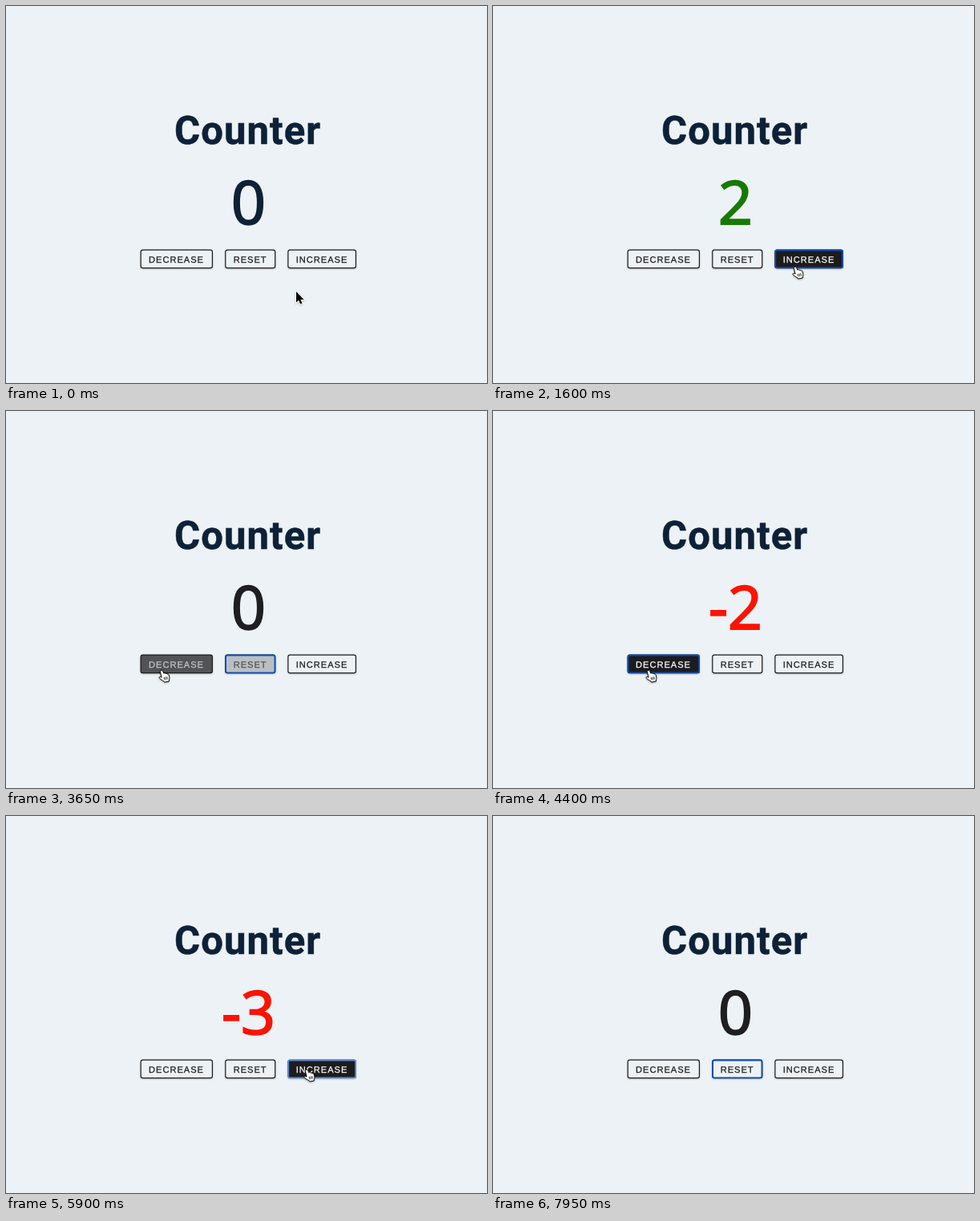
Animation, 600 px wide and 470 px high, one loop 8 s. Source, as an HTML page:

```html
<!DOCTYPE html>
<html lang="en">
<head>
<meta charset="utf-8">
<title>Counter</title>
<style>
  html, body { margin: 0; width: 100%; height: 100%; overflow: hidden; background: #ecf2f5; }
  svg { display: block; width: 600px; height: 470px; }
  text { text-rendering: geometricPrecision; }
  .title { font: 700 49px Roboto, sans-serif; letter-spacing: 1.1px; fill: #0d2138; stroke: #0d2138; stroke-width: 0.5px; }
  .value { font: 400 75px "Open Sans", sans-serif; text-anchor: middle; stroke-width: 2px; }
  .label { font: 400 11.1px "Liberation Sans", Arial, sans-serif; letter-spacing: 0.97px; stroke-width: 0.25px; }
</style>
</head>
<body>
<svg id="stage" viewBox="0 0 600 470">
  <defs>
    <filter id="soft" x="-20%" y="-40%" width="140%" height="180%"><feGaussianBlur stdDeviation="1.2"/></filter>
    <filter id="drop" x="-50%" y="-50%" width="200%" height="200%">
      <feDropShadow dx="0" dy="1" stdDeviation="0.8" flood-color="#000" flood-opacity="0.3"/>
    </filter>
  </defs>
  <text class="title" x="210" y="171.5">Counter</text>
  <text class="value" id="value" x="302.5" y="272">0</text>
  <g id="buttons"></g>
  <g id="cursor" filter="url(#drop)">
    <path id="arrow" d="M0 0v13.6l3.1-2.9 2 4.8 2.3-1-2-4.6h4.2z" fill="#000" stroke="#fff" stroke-width="1.4" paint-order="stroke"/>
    <g id="hand" transform="translate(-5 -0.5)" stroke="#000" stroke-width="1" stroke-linejoin="round" stroke-linecap="round">
      <path fill="#fff" d="M3.6.6c.9-.3 1.7.2 2 1l1.2 3c.6-.7 1.9-.5 2.2.3.7-.5 1.8-.3 2 .6.9-.4 1.9.1 2.1 1l.6 2.4c.4 1.7-.1 3-.4 4.3l.1 1.3-5.7 1.1-.9-1.4c-1.6-.5-3.4-1.6-5.4-3.6-.9-1-.1-2.1 1.1-1.7l1.6.7L2.3 2.5C2 1.6 2.7.8 3.6.6z"/>
      <path fill="none" stroke-width="0.8" d="M7.2 9.8l.7 2.7M9 9.4l.7 2.7M10.8 9l.7 2.6"/>
    </g>
  </g>
</svg>
<script>
const LOOP = 8000, FADE = 300;
const BG = [236, 242, 245], INK = [28, 28, 30], WHITE = [255, 255, 255], BLUE = [16, 78, 184];
const TOP = 303.6, HEIGHT = 23.6;
const $ = id => document.getElementById(id);

// hover: [enter, leave] spans; focus: [press, blur] spans
const buttons = [
  { label: "DECREASE", x: 167.6, w: 90.4, hover: [[3427, 5250]], focus: [[3850, 5700]] },
  { label: "RESET", x: 273.2, w: 63.1, hover: [[2511, 3421], [5262, 5330], [6311, 7635]],
    focus: [[2940, 3850], [6850, LOOP]] },
  { label: "INCREASE", x: 351.3, w: 85.7, hover: [[524, 2485], [5347, 6282]],
    focus: [[750, 2940], [5700, 6850]] }
];

// [time, shown value]
const counts = [
  [850, 1], [1250, 2], [1650, 3], [2050, 4], [3050, 0],
  [3950, -1], [4300, -2], [4650, -3], [5000, -4],
  [5800, -3], [6100, -2], [6950, 0]
];

// [start, end, x, y]
const moves = [
  [150, 600, 378, 325], [2400, 2620, 296, 323], [3400, 3460, 195, 323],
  [5160, 5403, 376, 316], [6200, 6400, 308, 315], [7620, 7720, 517, 21]
];
const GONE = 7740;

const clamp = v => Math.max(0, Math.min(1, v));
const smooth = u => u * u * (3 - 2 * u);
const mix = (a, b, k) => a + (b - a) * k;
const blend = (a, b, k) => `rgb(${a.map((v, i) => Math.round(mix(v, b[i], k))).join(",")})`;
const inSpan = (spans, t) => spans.find(([a, b]) => t >= a && t < b);

function add(parent, tag, attrs) {
  const el = document.createElementNS("http://www.w3.org/2000/svg", tag);
  for (const k in attrs) el.setAttribute(k, attrs[k]);
  return parent.appendChild(el);
}

function box(b, inset, extra) {
  return add($("buttons"), "rect", {
    x: b.x + inset, y: TOP + inset, width: b.w - 2 * inset, height: HEIGHT - 2 * inset,
    rx: 3 - inset, fill: "none", ...extra
  });
}

function paint(el, color) {
  el.setAttribute("fill", color);
  el.setAttribute("stroke", color);
}

for (const b of buttons) {
  box(b, 0, { y: TOP + 0.8, fill: "#000", opacity: 0.25, filter: "url(#soft)" });
  b.face = box(b, 0.3, {});
  b.edge = box(b, 0.6, { stroke: blend(INK, INK, 0), "stroke-width": 1.2 });
  b.halo = box(b, -0.3, { stroke: "#fff", "stroke-width": 1 });
  b.ring = box(b, 0.9, { stroke: "#fff", "stroke-width": 1.8 });
  b.text = add($("buttons"), "text", { class: "label", x: b.x + 10.5, y: 319.7 });
  b.text.textContent = b.label;
}

// Linear fade in and out; a short hover fades from whatever level it reached
function hoverLevel(spans, t) {
  let level = 0;
  for (const [a, b] of spans) {
    if (t < a) continue;
    const up = clamp((Math.min(t, b) - a) / FADE);
    level = clamp(up - Math.max(0, t - b) / FADE);
  }
  return level;
}

function cursorAt(t) {
  let x = 362, y = 356;
  for (const [a, b, tx, ty] of moves) {
    const k = smooth(clamp((t - a) / (b - a)));
    x = mix(x, tx, k);
    y = mix(y, ty, k);
  }
  return [x, y];
}

function valueColor(n, t) {
  if (n > 0) return "#177a00";
  if (n < 0) return "#fd1300";
  return t < counts[0][0] ? "#0d2138" : "#1f1e20";
}

function draw(t) {
  let n = 0;
  for (const [at, v] of counts) if (t >= at) n = v;
  $("value").textContent = n;
  paint($("value"), valueColor(n, t));

  for (const b of buttons) {
    const k = hoverLevel(b.hover, t), held = inSpan(b.focus, t);
    b.face.setAttribute("fill", blend(BG, INK, k));
    paint(b.text, blend(INK, WHITE, k));
    b.ring.style.display = b.halo.style.display = held ? "" : "none";
    if (held) {
      const f = clamp((t - held[0]) / FADE);
      b.ring.setAttribute("stroke", blend(WHITE, BLUE, f));
      b.halo.setAttribute("opacity", 1 - f);
    }
  }

  const [x, y] = cursorAt(t), over = buttons.some(b => inSpan(b.hover, t));
  $("cursor").setAttribute("transform", `translate(${x} ${y})`);
  $("cursor").style.display = t < GONE ? "" : "none";
  $("hand").style.display = over ? "" : "none";
  $("arrow").style.display = over ? "none" : "";
}

let start;
function tick(now) {
  if (start === undefined) start = now;
  draw((now - start) % LOOP);
  requestAnimationFrame(tick);
}
draw(0);
requestAnimationFrame(tick);
</script>
</body>
</html>
```
